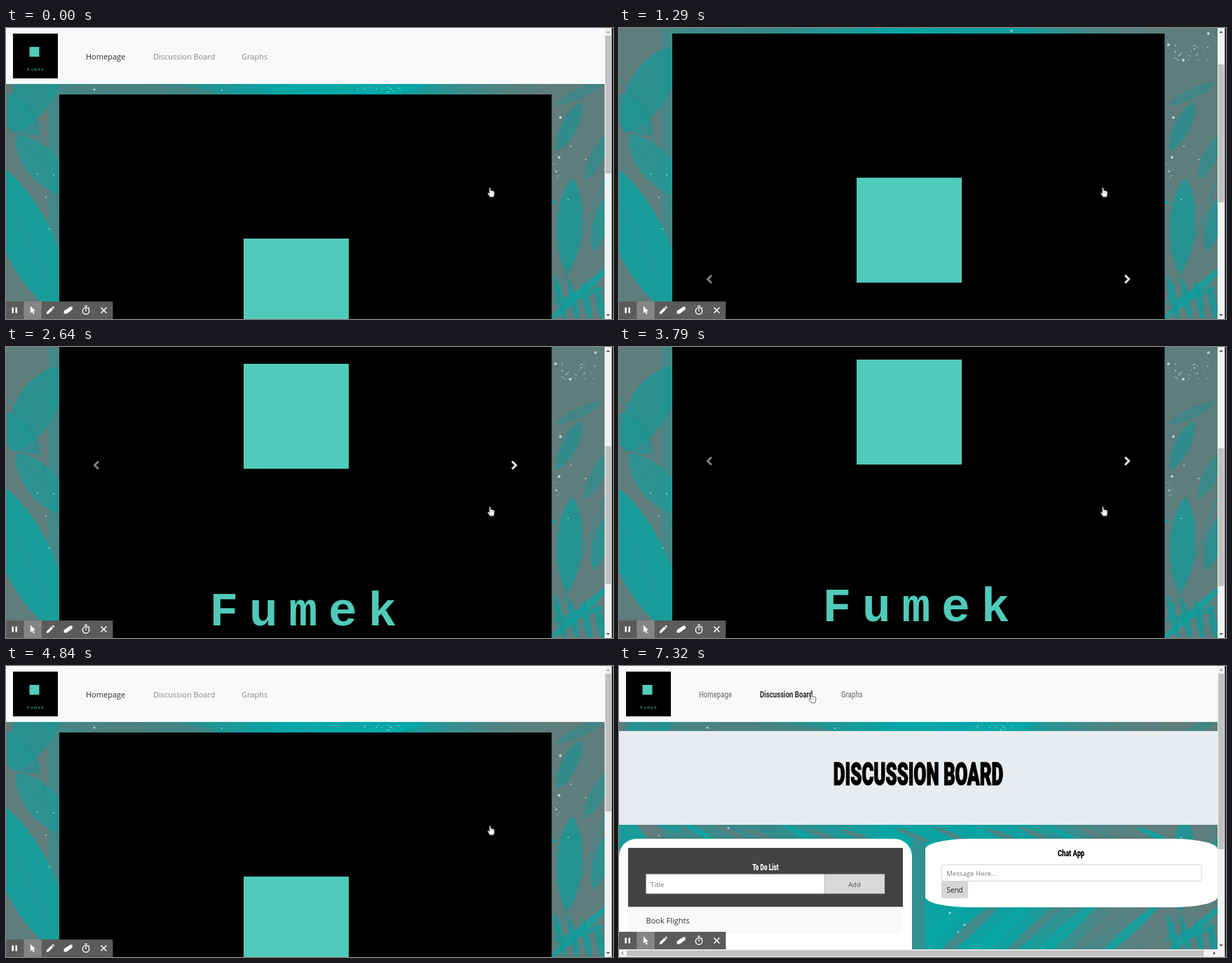
Write an HTML page with a canvas that moves like this. It is 866 px wide and 416 px high and loops after 8 s.

```html
<!DOCTYPE html>
<html lang="en">
<head>
<meta charset="utf-8">
<title>Team site tour</title>
<style>
html, body { margin: 0; width: 100%; height: 100%; overflow: hidden; background: #000; }
canvas { display: block; }
</style>
</head>
<body>
<canvas id="stage" width="866" height="416"></canvas>
<script>
const W = 866, H = 416, LOOP = 8000, VIEW = 854;
const TEAL = '#51cbb9';
const SANS = '"Open Sans", "Noto Sans", sans-serif';
const MONO = '"Liberation Mono", monospace';
const BRAND = 'Fumek';
const stage = document.getElementById('stage').getContext('2d');
let c = stage;

// [start time, scroll offset]
const scrolls = [
  [0, 0], [850, 12], [1000, 52], [1160, 80], [1290, 87],
  [1640, 106], [1770, 148], [1900, 178], [2030, 187],
  [2510, 230], [2640, 277], [2770, 284], [2950, 292], [3080, 298],
  [3790, 283], [3940, 204], [4090, 197], [4270, 143], [4400, 110],
  [4550, 96], [4710, 32], [4840, 0]
];
// [start time, x, y]
const pointer = [
  [0, 692, 235], [5240, 640, 255], [5370, 520, 290], [5500, 358, 320],
  [5740, 322, 210], [5870, 284, 84], [6010, 275, 46], [7320, 276, 46]
];
const BOARD_AT = 6140, BAR_AT = 7320;

const at = (steps, t) => steps.findLast(s => s[0] <= t);

function box(x, y, w, h, color) {
  c.fillStyle = color;
  c.fillRect(x, y, w, h);
}

function round(x, y, w, h, r, color) {
  c.fillStyle = color;
  c.beginPath();
  c.roundRect(x, y, w, h, r);
  c.fill();
}

function line(points, color, width) {
  c.strokeStyle = color;
  c.lineWidth = width;
  c.beginPath();
  points.forEach(p => c.lineTo(...p));
  c.stroke();
}

function poly(points, color) {
  c.fillStyle = color;
  c.beginPath();
  points.forEach(p => c.lineTo(...p));
  c.closePath();
  c.fill();
}

function dot(x, y, r, color) {
  c.fillStyle = color;
  c.beginPath();
  c.arc(x, y, r, 0, 7);
  c.fill();
}

function text(s, x, y, font, color, align = 'left') {
  c.font = font;
  c.fillStyle = color;
  c.textAlign = align;
  c.fillText(s, x, y);
}

// Condensed display face
function display(s, x, y, size, color, align, ratio, weight = 900, bold = 0) {
  c.save();
  c.translate(x, y);
  c.scale(ratio, 1);
  text(s, 0, 0, `${weight} ${size}px Roboto, sans-serif`, color, align);
  if (bold) {
    c.strokeStyle = color;
    c.lineWidth = bold;
    c.strokeText(s, 0, 0);
  }
  c.restore();
}

function spaced(s, x, y, pitch, font, color) {
  [...s].forEach((ch, i) => text(ch, x + i * pitch, y, font, color, 'center'));
}

function leaf(x1, y1, x2, y2, w, color) {
  const len = Math.hypot(x2 - x1, y2 - y1);
  const nx = -(y2 - y1) / len * w, ny = (x2 - x1) / len * w;
  const ax = x1 + (x2 - x1) * .25, ay = y1 + (y2 - y1) * .25;
  const bx = x1 + (x2 - x1) * .8, by = y1 + (y2 - y1) * .8;
  c.fillStyle = color;
  c.beginPath();
  c.moveTo(x1, y1);
  c.bezierCurveTo(ax + nx, ay + ny, bx + nx, by + ny, x2, y2);
  c.bezierCurveTo(bx - nx, by - ny, ax - nx, ay - ny, x1, y1);
  c.fill();
  line([[x1, y1], [x2, y2]], 'rgba(80,130,130,.35)', 1);
}

function seeded(seed) {
  return () => (seed = seed * 16807 % 2147483647) / 2147483647;
}

function paintFoliage() {
  const rnd = seeded(77);
  box(0, 0, VIEW, H, '#5f7d7d');

  // middle, bright palm fronds
  const glow = c.createLinearGradient(60, 0, 800, 0);
  glow.addColorStop(0, 'rgba(30,150,148,.4)');
  glow.addColorStop(.2, 'rgba(40,142,140,.75)');
  glow.addColorStop(.45, '#07a5a4');
  glow.addColorStop(.7, '#0f9f9e');
  glow.addColorStop(1, 'rgba(95,125,125,0)');
  box(60, 0, 740, H, glow);
  for (let i = 0; i < 16; i++) {
    const x = 90 + i * 43 + rnd() * 20;
    leaf(x, 222 + rnd() * 12, x + 50, 252, 5, i % 3 ? 'rgba(95,125,125,.75)' : 'rgba(0,172,170,.8)');
  }
  for (let i = 0; i < 9; i++) {
    const x = 440 + i * 46;
    leaf(x - 40, 425, x + 60, 335, 7 + rnd() * 6, i % 2 ? 'rgba(91,126,126,.65)' : 'rgba(4,168,166,.75)');
  }
  box(418, 247, 19, 169, 'rgba(82,128,128,.55)');
  leaf(80, 86, 300, 92, 12, 'rgba(92,126,126,.5)');
  leaf(370, 92, 600, 80, 24, '#04a8a8');

  // left edge
  leaf(8, 150, 74, 28, 38, 'rgba(28,150,148,.78)');
  leaf(-30, 90, 48, 152, 28, 'rgba(28,150,148,.65)');
  leaf(14, 152, 88, 238, 30, 'rgba(28,152,150,.75)');
  leaf(-24, 186, 82, 412, 48, 'rgba(18,160,157,.9)');
  line([[0, 70], [30, 110], [48, 150], [76, 260]], 'rgba(30,145,143,.6)', 2);

  // right edge
  leaf(786, 176, 821, 106, 15, 'rgba(35,145,144,.75)');
  leaf(784, 110, 852, 78, 10, 'rgba(40,140,140,.55)');
  leaf(800, 352, 808, 214, 24, 'rgba(22,153,151,.8)');
  leaf(826, 218, 860, 150, 13, 'rgba(35,146,144,.65)');
  leaf(838, 320, 858, 240, 15, 'rgba(28,150,148,.75)');
  line([[779, 395], [800, 355], [826, 290], [854, 215]], 'rgba(28,150,148,.7)', 2);
  for (let i = 0; i < 4; i++) {
    leaf(782 + i * 20, 352 + i * 4, 798 + i * 18, 420, 7, 'rgba(16,156,154,.8)');
  }
  leaf(784, 392, 854, 372, 7, 'rgba(16,156,154,.7)');

  // specks
  const speck = 'rgba(205,232,230,.8)';
  [[791, 128, 2], [789, 185, 2], [784, 24, 2], [805, 46, 2], [841, 8, 2],
   [560, 4, 1.6], [785, 205, 1.3], [806, 169, 1], [827, 188, 1], [802, 245, 1],
   [45, 209, .9], [68, 210, .9], [57, 242, .9], [62, 287, 1], [126, 88, 1.5],
   [308, 89, 1], [472, 353, 1.6], [493, 370, 1.6], [484, 380, 1.2],
   [156, 232, 1.4]].forEach(([x, y, r]) => dot(x, y, r, speck));
  for (let i = 0; i < 26; i++) {
    dot(792 + rnd() * 50, 22 + rnd() * 24, .5 + rnd() * .5, speck);
    dot(500 + rnd() * 65, 80 + rnd() * 13, .4 + rnd() * .5, speck);
  }
  for (let i = 0; i < 8; i++) dot(780 + rnd() * 12, 194 + rnd() * 20, .6, speck);
}

const foliage = document.createElement('canvas');
foliage.width = W;
foliage.height = H;
c = foliage.getContext('2d');
paintFoliage();
c = stage;

function nav(y, board) {
  box(0, y, VIEW, 80, '#f8f9fa');
  box(10, y + 8, 64, 64, '#000');
  box(33.5, y + 27, 14, 14, TEAL);
  spaced(BRAND, 32, y + 61, 5, `6px ${MONO}`, TEAL);
  const links = board
    ? [['Homepage', 114], ['Discussion Board', 201], ['Graphs', 317]]
    : [['Homepage', 114], ['Discussion Board', 210], ['Graphs', 336]];
  links.forEach(([s, x], i) => {
    const active = i === (board ? 1 : 0);
    if (board) display(s, x, y + 44.5, 12.5, active ? '#2b2d2e' : '#808283', 'left', .77, active ? 700 : 500);
    else text(s, x, y + 44.5, `11px ${SANS}`, active ? '#2a2a2a' : '#858788');
  });
}

function chevron(x, y, dir, color) {
  line([[x - 3 * dir, y - 5.5], [x + 2.5 * dir, y], [x - 3 * dir, y + 5.5]], color, 3);
}

function home(scroll) {
  nav(-scroll, false);
  box(76, 95 - scroll, 702.5, 735, '#000');
  box(339, 301 - scroll, 150, 150, TEAL);
  spaced(BRAND, 311, 675 - scroll, 56.5, `bold 68px ${MONO}`, TEAL);
  chevron(129, 446 - scroll, -1, '#808080');
  chevron(725, 446 - scroll, 1, '#e8e8e8');
}

function board() {
  nav(0, true);
  box(0, 93, VIEW, 134, '#e9ecef');
  display('DISCUSSION BOARD', 427, 170, 45, '#000', 'center', .573, 900, 1.6);

  round(0, 247, 418, 190, 25, '#fff');
  box(13, 260, 392, 84.5, '#444342');
  display('To Do List', 209, 292, 13, '#fff', 'center', .64);
  box(38.5, 297.5, 255, 28, '#fff');
  box(293.5, 297.5, 85.5, 28, '#d9d9d9');
  text('Title', 45, 315.5, `9.8px ${SANS}`, '#777');
  text('Add', 336, 315.5, `9.8px ${SANS}`, '#555', 'center');
  box(13, 344.5, 392, 38, '#f9f9f9');
  text('Book Flights', 38.5, 368, `11px ${SANS}`, '#333');

  round(437, 247, 417, 98, { x: 62, y: 15 }, '#fff');
  display('Chat App', 645, 271.5, 13, '#000', 'center', .71);
  c.beginPath();
  c.roundRect(460, 284, 371, 23.5, 3);
  c.strokeStyle = '#ced4da';
  c.lineWidth = 1;
  c.stroke();
  text('Message Here...', 467, 299.5, `9.7px ${SANS}`, '#737b82');
  round(460, 308, 38, 24, 2, '#d6d6d6');
  text('Send', 479, 323.5, `9.9px ${SANS}`, '#222', 'center');
}

function arrow(x, y, dx, dy, color) {
  poly([[x + dx * 2, y + dy * 2], [x - dx + dy * 2.5, y - dy + dx * 2.5],
    [x - dx - dy * 2.5, y - dy - dx * 2.5]], color);
}

function scrollbars(scroll, wide) {
  const end = wide ? 405 : H;
  box(VIEW, 0, 10.5, H, '#f1f1f1');
  box(855, 11 + scroll * .473, 8.5, wide ? 251 : 197, '#c1c1c1');
  arrow(859, 6, 0, -1, scroll ? '#505050' : '#a3a3a3');
  arrow(859, end - 6, 0, 1, '#505050');
  if (wide) {
    box(0, 405, 864.5, 11, '#f1f1f1');
    box(11, 406.5, 823, 8.5, '#c1c1c1');
    arrow(5, 410.5, -1, 0, '#a3a3a3');
    arrow(849, 410.5, 1, 0, '#505050');
  }
  box(864.5, 0, 1.5, H, '#111');
}

const icons = [
  () => { box(-4, -4, 2.6, 8, '#fff'); box(1, -4, 2.6, 8, '#fff'); },
  () => poly([[-3, -6], [4, 1], [1, 1.4], [3, 5], [1.2, 5.8], [-.5, 2.3], [-3, 4.3]], '#fff'),
  () => {
    poly([[-5.5, 5.5], [-5, 2.5], [1.5, -4], [4, -1.5], [-2.5, 5]], '#fff');
    poly([[2.3, -4.8], [3.8, -6], [6, -3.8], [4.8, -2.3]], '#fff');
  },
  () => poly([[-6, 1], [3, -5], [6, -5], [6, -1], [-2, 5], [-6, 5]], '#fff'),
  () => {
    c.beginPath();
    c.arc(0, 1, 4.7, 0, 7);
    c.strokeStyle = '#fff';
    c.lineWidth = 1.4;
    c.stroke();
    line([[-2, -6], [2, -6]], '#fff', 1.5);
    line([[0, -2], [0, 1.5]], '#fff', 1.3);
    line([[3.5, -4], [5, -2.7]], '#fff', 1.3);
  },
  () => {
    line([[-4, -4], [4, 4]], '#fff', 1.5);
    line([[4, -4], [-4, 4]], '#fff', 1.5);
  }
];

function toolbar(y, paused) {
  const set = paused ? icons.slice(1) : icons;
  const cell = 25.4;
  box(0, y, set.length * cell, 25, '#5b5b5b');
  box(paused ? 0 : cell, y, cell, 25, '#858585');
  set.forEach((draw, i) => {
    c.save();
    c.translate((i + .5) * cell - .3, y + 12.5);
    draw();
    c.restore();
  });
}

function hand(x, y) {
  c.save();
  c.translate(x, y);
  c.beginPath();
  c.moveTo(-2.6, -6);
  c.quadraticCurveTo(-1.6, -7.6, -.7, -6);
  c.lineTo(-.4, -2.4);
  c.quadraticCurveTo(3.5, -2.6, 5, -.8);
  c.lineTo(4.7, 3.2);
  c.lineTo(3.6, 6.8);
  c.lineTo(-1.4, 6.8);
  c.lineTo(-4.8, 1.8);
  c.quadraticCurveTo(-5, .2, -3.4, .6);
  c.lineTo(-2.2, 1.7);
  c.closePath();
  c.fillStyle = '#fff';
  c.fill();
  c.strokeStyle = '#444';
  c.lineWidth = .8;
  c.stroke();
  line([[1, -.5], [1, 1.4]], '#777', .6);
  line([[3, -.5], [3, 1.4]], '#777', .6);
  c.restore();
}

function frame(now) {
  const t = now % LOOP;
  const onBoard = t >= BOARD_AT;
  const scroll = at(scrolls, t)[1];
  const [, x, y] = at(pointer, t);
  c.drawImage(foliage, 0, 0);
  if (onBoard) board();
  else home(scroll);
  scrollbars(scroll, onBoard);
  toolbar(onBoard ? 380 : 391, onBoard && t < BAR_AT);
  hand(x, y);
  requestAnimationFrame(frame);
}
requestAnimationFrame(frame);
</script>
</body>
</html>
```
